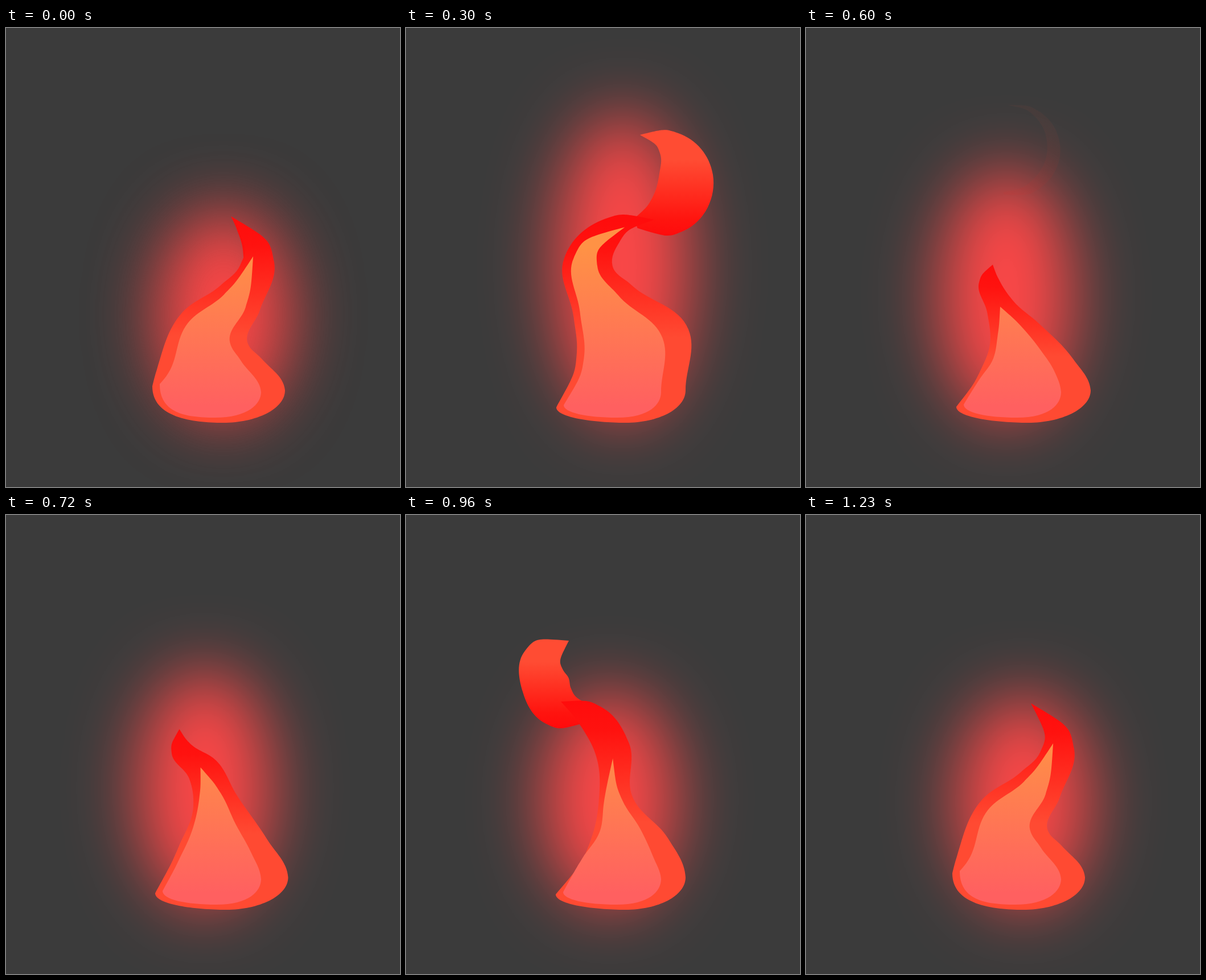
These frames come from a looping animation (692 by 807 pixels, 1260 ms). An HTML page with a canvas:

```html
<!DOCTYPE html>
<html lang="en">
<head>
<meta charset="utf-8">
<title>Flame</title>
<style>
  html, body { margin: 0; width: 100%; height: 100%; overflow: hidden; background: #3b3b3b; }
  canvas { display: block; }
</style>
</head>
<body>
<canvas id="stage" width="692" height="807"></canvas>
<script>
const ctx = document.getElementById('stage').getContext('2d');
const LOOP = 1260, STEP = 30;
const BASE = [378, 640, 116];

// A flame is a ribbon: a tip, then spine rows [x, y, half width] down to the base.
// heel: lower left corner, toe: right end of the base, core: where the core starts on the spine,
// glow: centre x and top.
const rest = { t: 0, glow: [382, 318], tip: [395, 331], heel: [257, 630], toe: 490, core: .85,
  rows: [[441, 414, 30], [411, 475, 41], [367, 528, 64], [357, 590, 92]] };
const poses = [
  rest,
  { t: 180, glow: [380, 213], tip: [445, 323], heel: [267, 664], toe: 490, core: 1,
    rows: [[406, 372, 32], [372, 418, 54], [371, 497, 75], [380, 580, 99]] },
  { t: 300, glow: [380, 150], tip: [436, 337], heel: [264, 667], toe: 491, core: .7,
    rows: [[362, 356, 24], [320, 412, 43], [345, 480, 58], [398, 550, 100]] },
  { t: 600, glow: [352, 250], tip: [328, 416], heel: [264, 666], toe: 500, core: 2,
    rows: [[321, 443, 17], [341, 490, 25], [366, 540, 48], [388, 592, 82]] },
  { t: 840, glow: [347, 295], tip: [281, 337], heel: [260, 664], toe: 491, core: 1.8,
    rows: [[292, 376, 19], [350, 405, 32], [368, 465, 31], [374, 560, 73]] },
  { t: 960, glow: [358, 310], tip: [272, 328], heel: [263, 667], toe: 491, core: 2.2,
    rows: [[326, 356, 25], [362, 410, 31], [368, 500, 30], [391, 573, 69]] },
  { ...rest, t: 1230 }];

// Wisps grow out of the tip, break off at the last pose, then drift, thin and fade.
const wisps = [
  { end: 615, drift: [-60, -55], poses: [
    { t: 0, tip: [397, 334], rows: [[415, 355, 9], [428, 375, 15], [436, 395, 20], [441, 414, 24]] },
    { t: 180, tip: [419, 222], rows: [[438, 258, 26], [467, 304, 33], [452, 347, 27], [428, 372, 12]] },
    { t: 300, tip: [411, 188], rows: [[462, 203, 24], [492, 257, 47], [460, 328, 40], [404, 343, 9]] }] },
  { end: 1200, drift: [100, -135], poses: [
    { t: 840, tip: [281, 339], rows: [[288, 362, 10], [300, 380, 16], [322, 391, 20], [345, 402, 26]] },
    { t: 960, tip: [286, 221], rows: [[243, 256, 38], [245, 298, 42], [268, 336, 38], [320, 350, 15]] }] }];

const clamp = v => Math.max(0, Math.min(1, v));

function mix(a, b, k) {
  if (typeof a === 'number') return a + (b - a) * k;
  if (Array.isArray(a)) return a.map((v, i) => mix(v, b[i], k));
  return Object.fromEntries(Object.keys(a).map(key => [key, mix(a[key], b[key], k)]));
}

function poseAt(keys, t) {
  const i = keys.findIndex(key => key.t > t);
  if (i < 0) return keys[keys.length - 1];
  const a = keys[Math.max(0, i - 1)], b = keys[i];
  return mix(a, b, clamp((t - a.t) / (b.t - a.t || 1)));
}

// Offsets each row at right angles to the spine.
function edges(tip, rows, end) {
  const right = [], left = [];
  rows.forEach(([x, y, w], i) => {
    const p = rows[i - 1] || tip, q = rows[i + 1] || end;
    const dx = q[0] - p[0], dy = q[1] - p[1], k = w / Math.hypot(dx, dy);
    right.push([x + dy * k, y - dx * k]);
    left.unshift([x - dy * k, y + dx * k]);
  });
  return { right, left };
}

// Smooth curve through the points; "after" only sets the direction at the end.
function curveThrough(path, points, after) {
  const all = after ? [...points, after] : points;
  const len = (a, b) => Math.hypot(b[0] - a[0], b[1] - a[1]) || .001;
  const tangent = i => {
    const p = all[i - 1], q = all[i], r = all[i + 1];
    if (!p || !r) return null;
    const l0 = len(p, q), l1 = len(q, r);
    const v = [0, 1].map(c => (q[c] - p[c]) * l1 / l0 + (r[c] - q[c]) * l0 / l1);
    const m = Math.hypot(...v) || 1;
    return [v[0] / m, v[1] / m];
  };
  for (let i = 0; i < points.length - 1; i++) {
    const a = points[i], b = points[i + 1], h = len(a, b) * .36;
    const ta = tangent(i), tb = tangent(i + 1);
    const ca = ta && [a[0] + ta[0] * h, a[1] + ta[1] * h];
    const cb = tb && [b[0] - tb[0] * h, b[1] - tb[1] * h];
    path.bezierCurveTo(...(ca || cb || a), ...(cb || ca || b), ...b);
  }
}

function flamePath(tip, rows, heel, toe, floor) {
  const { right, left } = edges(tip, rows, BASE);
  const mid = (heel[0] + toe[0]) / 2 + 8;
  const path = new Path2D();
  path.moveTo(...tip);
  curveThrough(path, [tip, ...right, toe], [toe[0], toe[1] + 12]);
  path.bezierCurveTo(toe[0], floor - 24, mid + 58, floor, mid, floor);
  path.bezierCurveTo(mid - 54, floor, heel[0], floor - 9, ...heel);
  curveThrough(path, [heel, ...left, tip]);
  return path;
}

function wispPath(tip, rows) {
  const { right, left } = edges(tip, rows, rows[rows.length - 1]);
  const path = new Path2D();
  path.moveTo(...tip);
  curveThrough(path, [tip, ...right]);
  path.lineTo(...left[0]);
  curveThrough(path, [...left, tip]);
  return path;
}

function shade(y0, y1, stops) {
  const g = ctx.createLinearGradient(0, y0, 0, y1);
  stops.forEach(([at, color]) => g.addColorStop(at, color));
  return g;
}

function drawGlow([x, top]) {
  const away = 2000, bottom = 688;
  ctx.save();
  ctx.shadowColor = '#ff4747';
  ctx.shadowBlur = 118;
  ctx.shadowOffsetX = away;
  ctx.fillStyle = '#000';
  ctx.beginPath();
  ctx.ellipse(x - away, (top + bottom) / 2, 116, (bottom - top) / 2, 0, 0, Math.PI * 2);
  ctx.fill();
  ctx.restore();
}

function drawWisp({ end, drift, poses }, t) {
  const start = poses[0].t, release = poses[poses.length - 1].t;
  if (t < start || t >= end) return;
  const { tip, rows } = poseAt(poses, t);
  const k = clamp((t - release) / (end - release));
  const move = ([x, y, w]) => [x + drift[0] * k, y + drift[1] * k, w * (1 - .8 * k)];
  const head = move(tip), body = rows.map(move);
  const warm = mix([255, 14, 13], [255, 76, 51], clamp((t - start) / 120));
  const color = `rgb(${warm})`;
  ctx.globalAlpha = 1 - k;
  ctx.fillStyle = shade(body[3][1] + 20, head[1],
    [[0, '#ff0c0c'], [.15, '#ff140f'], [.75, color], [1, color]]);
  ctx.fill(wispPath(head, body));
  ctx.globalAlpha = 1;
}

function drawBody({ tip, rows, heel, toe }) {
  ctx.fillStyle = shade(tip[1], 694,
    [[0, '#ff0c0c'], [.14, '#ff120f'], [.58, '#ff4a32'], [1, '#ff4a32']]);
  ctx.fill(flamePath(tip, rows, heel, [toe, 637], 694));
}

// The core follows the body's spine, narrower and leaning left towards the base.
function drawCore({ tip, rows, heel, core }) {
  const spine = [[...tip, 0], ...rows, BASE];
  const along = u => mix(spine[Math.floor(u)], spine[Math.floor(u) + 1], u % 1);
  const inner = [.3, .55, .8].map(k => {
    const [x, y, w] = along(mix(core, 5, k));
    return [x - 17 * k, y, w * (.4 + .37 * k)];
  });
  ctx.fillStyle = shade(385, 665, [[0, '#ff9245'], [1, '#ff6060']]);
  ctx.fill(flamePath(along(core).slice(0, 2), inner, [heel[0] + 13, heel[1] - 4], [448, 640], 685));
}

function draw(now) {
  const t = Math.floor(now / STEP) * STEP % LOOP;
  const pose = poseAt(poses, t);
  ctx.fillStyle = '#3b3b3b';
  ctx.fillRect(0, 0, 692, 807);
  drawGlow(pose.glow);
  wisps.forEach(wisp => drawWisp(wisp, t));
  drawBody(pose);
  drawCore(pose);
  requestAnimationFrame(draw);
}
requestAnimationFrame(draw);
</script>
</body>
</html>
```
